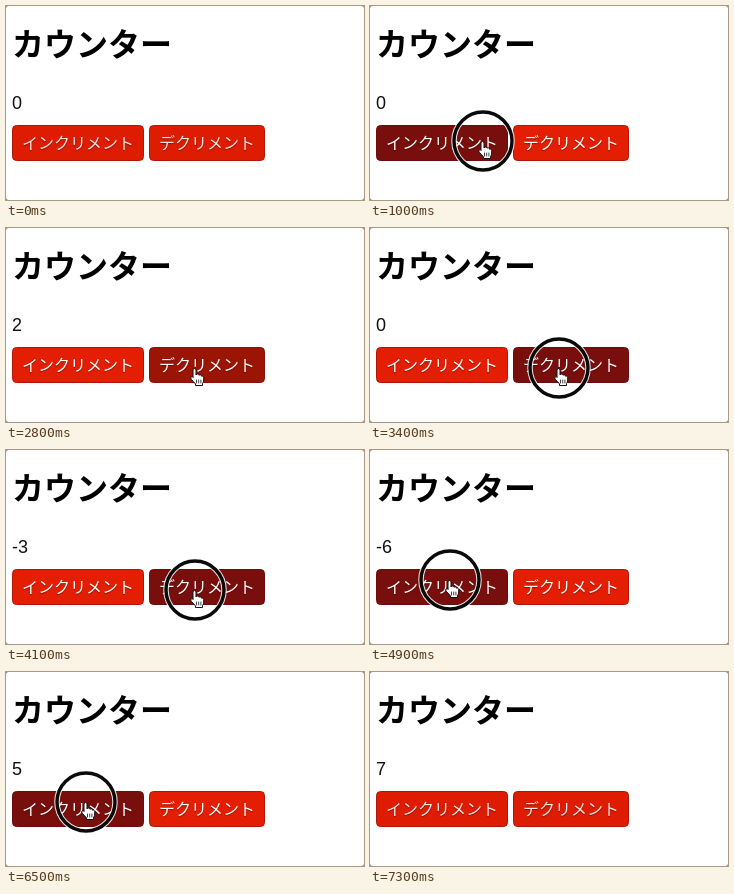
Animation, 358 px wide and 194 px high, one loop 7.4 s. Source, as an HTML page:

```html
<!DOCTYPE html>
<html lang="ja">
<head>
<meta charset="utf-8">
<title>カウンター</title>
<style>
  html, body { margin: 0; width: 100%; height: 100%; overflow: hidden; background: #8a8a8a; }
  svg { display: block; width: 358px; height: 194px; background: #fff; border-radius: 3px; }
  text { font-family: "Noto Sans CJK JP", "Noto Sans CJK", sans-serif; }
  .title { font-size: 32px; font-weight: 700; }
  .count { font-family: "Liberation Sans", sans-serif; font-size: 18px; fill: #111; }
  .button rect { fill: #e41e02; stroke: #ad1608; }
  .button text { font-size: 16px; fill: #fff; text-shadow: 0 1px 1px rgba(70, 0, 0, .5); }
  .idle .button rect { fill: #de1c02; }
  .idle .button text { fill: #f6e6e6; }
  .button.hover rect { fill: #9c1404; stroke: #861208; }
  .button.down rect { fill: #780f0c; stroke: #6b0d0a; }
  .ring circle { fill: none; }
  .hand { fill: #fff; stroke: #111; stroke-linejoin: round; stroke-linecap: round; }
</style>
</head>
<body>
<svg id="stage" viewBox="0 0 358 194">
  <text class="title" x="6" y="50">カウンター</text>
  <text class="count" id="count" x="6" y="103">0</text>
  <g class="button" id="inc">
    <rect x="6.5" y="119.5" width="131" height="35" rx="4"/>
    <text x="16" y="143">インクリメント</text>
  </g>
  <g class="button" id="dec">
    <rect x="143.5" y="119.5" width="115" height="35" rx="4"/>
    <text x="153" y="143">デクリメント</text>
  </g>
  <g id="cursor">
    <g class="ring" id="ring">
      <circle r="29" stroke="#fff" stroke-width="5.5" opacity=".85"/>
      <circle r="29" stroke="#0a0a0a" stroke-width="3.4"/>
    </g>
    <g class="hand">
      <path d="M-2 9V2Q-2 .5-.5 .5T1 2V7Q1.5 5.8 2.8 6T4 7.3Q4.600 6.500 5.600 6.900T6.500 8.200Q7.200 7.700 8 8.200T8.700 9.700V12Q8.700 14 7.500 15.500V17.500H.5V16Q-1.500 13.500-3.500 11.500Q-5 9.800-4 9T-2 9Z"/>
      <path d="M1.500 12V15M3.700 12V15M5.900 12V15" fill="none" stroke-width=".8"/>
    </g>
  </g>
</svg>
<script>
const LOOP = 7400, STEP = 100, HOLD = 105;
const $ = id => document.getElementById(id);
const [stage, count, inc, dec, cursor, ring] =
  ["stage", "count", "inc", "dec", "cursor", "ring"].map($);

// Pointer stops: time, x, y
const path = [
  [0, 205, 200], [400, 200, 146], [900, 113, 135], [2000, 113, 135],
  [2450, 189, 140], [4400, 189, 140], [4800, 80, 130],
  [6900, 80, 130], [7300, 92, 204], [LOOP, 92, 204]
];

const click = (up, delta, hold = HOLD) => ({ down: up - hold, up, delta });
const clicks = [
  click(1300, 1, 300), click(1600, 1, 150), click(2000, 1, 150),
  click(2700, -1, 150),
  ...[2990, 3240, 3490, 3740, 3960, 4110, 4250, 4395].map(t => click(t, -1)),
  ...Array.from({ length: 13 }, (_, i) => click(4950 + 150 * i, 1))
];

function pointerAt(t) {
  const i = path.findIndex(p => p[0] > t);
  const [t0, x0, y0] = path[i - 1], [t1, x1, y1] = path[i];
  const k = (t - t0) / (t1 - t0), e = k * k * (3 - 2 * k);
  return [x0 + (x1 - x0) * e, y0 + (y1 - y0) * e];
}

function paint(button, left, right, x, y, pressed) {
  const over = x >= left && x < right && y >= 119 && y < 155;
  button.classList.toggle("hover", over);
  button.classList.toggle("down", over && pressed);
}

function draw(now) {
  const t = Math.floor((now % LOOP) / STEP) * STEP;
  const [x, y] = pointerAt(t);
  const pressed = clicks.some(c => t >= c.down && t < c.up);
  count.textContent = clicks.reduce((n, c) => n + (t >= c.up ? c.delta : 0), 0);
  paint(inc, 6, 138, x, y, pressed);
  paint(dec, 143, 259, x, y, pressed);
  stage.classList.toggle("idle", y > 194);
  cursor.setAttribute("transform", `translate(${x} ${y})`);
  ring.style.display = pressed ? "" : "none";
}

let start;
function tick(now) {
  start ??= now;
  draw(now - start);
  requestAnimationFrame(tick);
}
draw(0);
requestAnimationFrame(tick);
</script>
</body>
</html>
```
